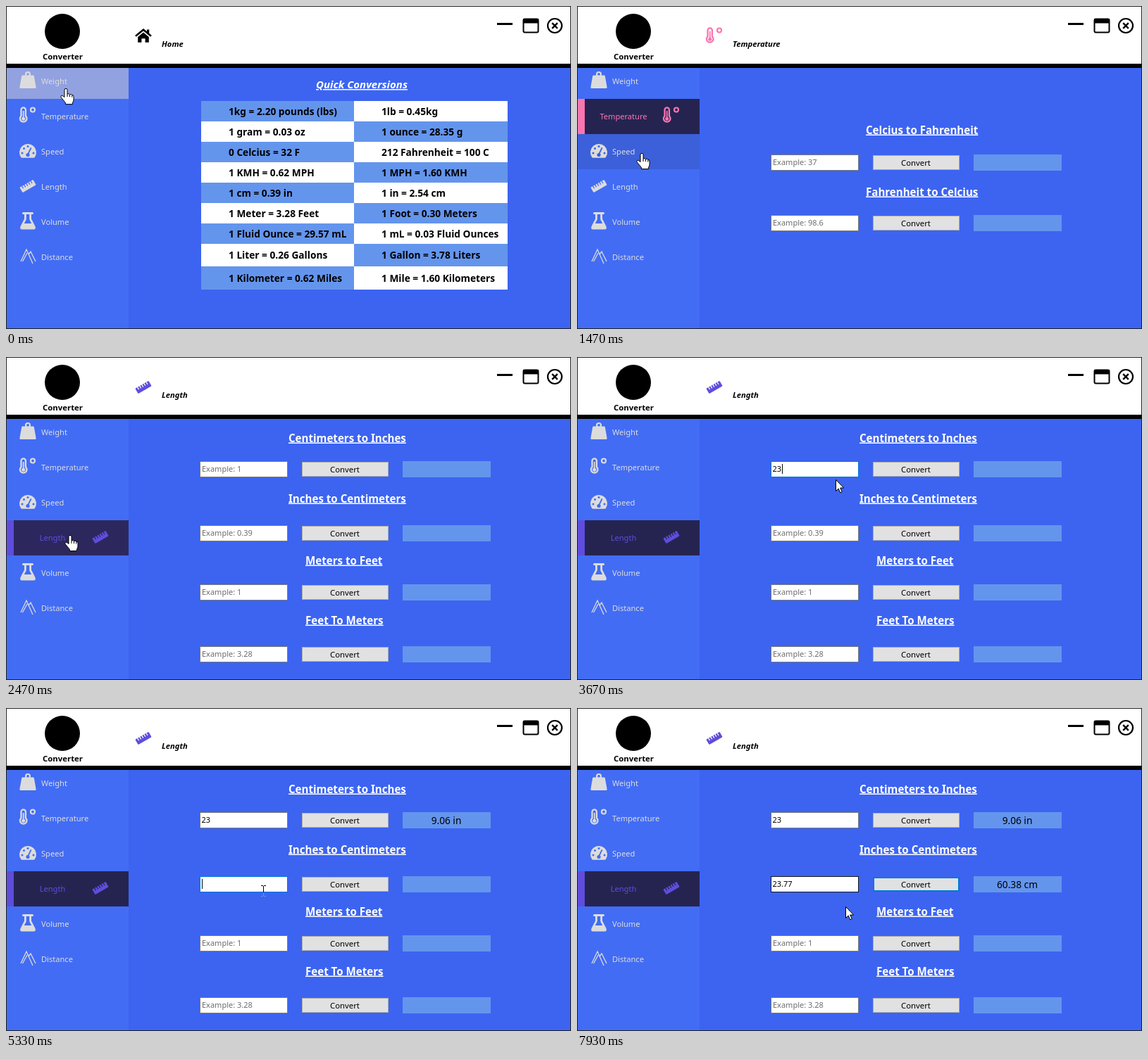
Animation of 802x459 px, one loop 8000 ms. Source, as an HTML page:

```html
<!DOCTYPE html>
<html lang="en">
<head>
<meta charset="utf-8">
<title>Converter</title>
<style>
html, body { margin: 0; width: 100%; height: 100%; overflow: hidden; background: #3c64f0 }
svg { display: block }
text { font-family: "Noto Sans", "Open Sans", sans-serif; font-size: 11px; white-space: pre }
.side { font-size: 11.1px }
.head { font-size: 11.2px; font-weight: 700; font-style: italic }
.title { font-size: 15.1px; font-weight: 700; text-decoration: underline; fill: #fff }
.cell { font-size: 13.7px; font-weight: 700 }
</style>
</head>
<body>
<svg id="stage" width="802" height="459" viewBox="0 0 802 459"></svg>
<script>
const LOOP = 8000, FPS = 15;
const BLUE = '#3c64f0', SIDE = '#426cf4', PALE = '#6495ed', FOCUS = '#0078d7';
const MENU = ['Weight', 'Temperature', 'Speed', 'Length', 'Volume', 'Distance'];
const TINT = ['#ac7ef1', '#f976b0', '#fd8a72', '#5f4ddd'];

const QUICK = [
  ['1kg = 2.20 pounds (lbs)', '1lb = 0.45kg'],
  ['1 gram = 0.03 oz', '1 ounce = 28.35 g'],
  ['0 Celcius = 32 F', '212 Fahrenheit = 100 C'],
  ['1 KMH = 0.62 MPH', '1 MPH = 1.60 KMH'],
  ['1 cm = 0.39 in', '1 in = 2.54 cm'],
  ['1 Meter = 3.28 Feet', '1 Foot = 0.30 Meters'],
  ['1 Fluid Ounce = 29.57 mL', '1 mL = 0.03 Fluid Ounces'],
  ['1 Liter = 0.26 Gallons', '1 Gallon = 3.78 Liters'],
  ['1 Kilometer = 0.62 Miles', '1 Mile = 1.60 Kilometers']
];

// title, title x, example
const FORMS = [
  [['Kilograms to Pounds', 401, '5.5'], ['Pounds to Kilograms', 401, '3.9'],
   ['Grams to Ounces', 415, '28'], ['Ounces to Grams', 415, '1']],
  [['Celcius to Fahrenheit', 410, '37'], ['Fahrenheit to Celcius', 410, '98.6']],
  [['KMH to MPH', 434, '1'], ['MPH to KMH', 434, '1']],
  [['Centimeters to Inches', 401, '1'], ['Inches to Centimeters', 401, '0.39'],
   ['Meters to Feet', 425, '1'], ['Feet To Meters', 425, '3.28']]
];
// title centre, input top
const ROWS4 = [[115, 148], [201, 239], [289, 323], [374, 411]];
const ROWS2 = [[176, 211], [264, 297]];

// pointer path: tick, x, y
const PATH = [
  [0, 85, 117], [5, 85, 117], [10, 97, 161], [19, 97, 161], [22, 92, 209], [28, 92, 209],
  [32, 91, 253], [39, 91, 253], [42, 125, 266], [45, 195, 248], [48, 300, 190], [51, 366, 157],
  [53, 366, 160], [55, 367, 174], [60, 410, 172], [65, 468, 160], [69, 468, 160], [73, 430, 195],
  [76, 380, 245], [78, 366, 257], [79, 366, 257], [80, 365, 260], [97, 365, 260], [98, 366, 257],
  [106, 366, 255], [109, 415, 247], [111, 470, 246], [114, 470, 246], [116, 425, 220],
  [117, 395, 245], [118, 385, 262], [119, 381, 282]
];

const rect = (x, y, w, h, fill, more = '') =>
  `<rect x="${x}" y="${y}" width="${w}" height="${h}" fill="${fill}" ${more}/>`;
const frame = (x, y, w, h, fill, line, t = 1) =>
  rect(x + t / 2, y + t / 2, w - t, h - t, fill, `stroke="${line}" stroke-width="${t}"`);
const text = (s, x, y, cls = '', more = '') => `<text x="${x}" y="${y}" class="${cls}" ${more}>${s}</text>`;
const path = (d, more = '') => `<path d="${d}" ${more}/>`;
const line = (d, w, col) => path(d, `fill="none" stroke="${col}" stroke-width="${w}"`);
const dot = (x, y, r, col) => `<circle cx="${x}" cy="${y}" r="${r}" fill="${col}"/>`;
const ring = (x, y, r, w, col) => `<circle cx="${x}" cy="${y}" r="${r}" fill="none" stroke="${col}" stroke-width="${w}"/>`;
const at = (x, y, body, more = '') => `<g transform="translate(${x} ${y})" ${more}>${body}</g>`;

const ICONS = {
  Home: c => line('M-11 .8L0-8.3 11 .8', 2.6, c) + rect(5, -8.5, 3.2, 6, c) +
    path('M-7.8 2L0-4.5 7.8 2V9.8H2.6V4.2H-2.6V9.8H-7.8Z'),
  Weight: c => ring(0, -8, 3, 2.2, c) +
    path('M-7.5-6.5h15q1 0 1.3 1L11.6 10.3q.4 1.7-1.2 1.7H-10.4q-1.6 0-1.2-1.7L-8.8-5.5q.3-1 1.3-1Z'),
  Temperature: c => line('M-9.5-7.5a3.2 3.2 0 0 1 6.4 0v8.8a4.8 4.8 0 1 1-6.4 0Z', 2.3, c) +
    dot(-6.3, 5.2, 2.5, c) + line('M-6.3-6V5', 1.8, c) + ring(7, -7.5, 3, 2.2, c),
  Speed: (c, bg) => path('M-9.8 10A12 12 0 1 1 9.8 10Q9.3 10.7 8.4 10.7H-8.4Q-9.3 10.7-9.8 10Z') +
    [[-8, 4], [-5.5, -2.5], [0, -5.5], [8, 4]].map(p => dot(...p, 1.5, bg)).join('') +
    line('M0 6L4.6-3.6', 1.8, bg) + dot(0, 6.5, 2.6, bg),
  Length: (c, bg) => `<g transform="translate(0 1) rotate(-30)">` + rect(-11, -4.2, 22, 8.4, c, 'rx="1"') +
    line('M-7.2-4.5V-.5M-3.6-4.5V-.5M0-4.5V-.5M3.6-4.5V-.5M7.2-4.5V-.5', 1.3, bg) + '</g>',
  Volume: () => path('M-6.5-12h13a1 1 0 0 1 0 3H5v6.5L10.4 8q1.6 4.5-2.3 4.5H-8.1Q-12 12.5-10.4 8L-5-2.5V-9h-1.5a1 1 0 0 1 0-3Z' +
    'M-2.2-9H2.2V-1.8L5.2 4H-5.2L-2.2-1.8Z', 'fill-rule="evenodd"'),
  Distance: c => line('M-10 8L-2-9 7 11M-7.5 8L-1-4M1-2L4-6 11 8', 1.3, c)
};
const icon = (name, x, y, col, bg) => at(x, y, ICONS[name](col, bg), `fill="${col}"`);

function pointer(n) {
  let i = 0;
  while (i < PATH.length - 2 && PATH[i + 1][0] <= n) i++;
  const [t0, x0, y0] = PATH[i], [t1, x1, y1] = PATH[i + 1];
  const k = Math.min(1, (n - t0) / (t1 - t0));
  return [x0 + (x1 - x0) * k, y0 + (y1 - y0) * k].map(Math.round);
}

function header(page) {
  const name = page < 0 ? 'Home' : MENU[page];
  return rect(0, 0, 802, 82, '#fff') + dot(80, 36, 25, '#000') +
    text('Converter', 80.5, 76, '', 'text-anchor="middle" style="font-size:11.4px;font-weight:700"') +
    icon(name, 195, 42, page < 0 ? '#000' : TINT[page], '#fff') + text(name, 221, 58, 'head') +
    line('M697 25.5H719', 3, '#000') +
    rect(734.5, 18.5, 21, 19, '#fff', 'rx="2" stroke="#000" stroke-width="2"') + rect(734, 18, 22, 6.5, '#000') +
    ring(779, 28, 10, 2.2, '#000') + line('M775.2 24.2l7.6 7.6m0-7.6l-7.6 7.6', 2.4, '#000');
}

function sidebar(page, n, x, y) {
  const over = x < 174 ? Math.floor((y - 82) / 50) : -1;
  const pressed = n < 2 || [13, 25, 36].includes(n);
  let out = rect(0, 82, 174, 377, SIDE);
  MENU.forEach((name, i) => {
    const top = 82 + 50 * i, on = i === page, hot = i === over;
    const bg = on ? (hot ? '#2c285e' : '#252451') : !hot ? SIDE : pressed ? '#92a1e0' : '#3c60d9';
    const col = on ? TINT[i] : '#dcdcdc';
    out += rect(0, top, 174, 50, bg) + icon(name, on ? 134 : 31, top + 23, col, bg) +
      text(name, on ? 66 : 50, top + 29, 'side', `fill="${col}"` + (on ? ' text-anchor="middle"' : ''));
  });
  out += rect(0, 82, 802, 6, '#000');
  if (page >= 0) out += rect(1, 82 + 50 * page, 10, 50, TINT[page]);
  return out;
}

function quickTable() {
  let out = text('Quick Conversions', 440, 117, 'title', 'style="font-style:italic;font-size:15px"');
  const tops = [135, 164, 193, 222, 251, 280, 309, 338, 370, 403];
  QUICK.forEach((row, r) => row.forEach((s, c) => {
    const y = tops[r], h = tops[r + 1] - y;
    out += rect(c ? 494 : 277, y, c ? 218 : 217, h, (r + c) % 2 ? '#fff' : PALE) +
      text(s, c ? 533 : 316, y + h / 2 + 5.3, 'cell');
  }));
  return out;
}

// Contents and focus of the two fields used on the Length page
function fieldState(i, n, x, y) {
  const s = {};
  const overButton = x >= 420 && x < 543 && y >= ROWS4[i][1] && y < ROWS4[i][1] + 23;
  if (i === 0) {
    if (n >= 51) s.value = n < 53 ? '' : n < 54 ? '2' : '23';
    s.focus = n >= 51 && n < 66;
    s.button = n >= 66 && n < 78;
    s.down = n === 66 || n === 67;
    if (n >= 68) s.result = '9.06 in';
  } else {
    if (n >= 78) s.value = '23.77'.slice(0, n < 83 ? 0 : n < 85 ? 1 : n < 94 ? 2 : n < 102 ? 3 : n < 104 ? 4 : 5);
    s.focus = n >= 78 && n < 112;
    s.button = n >= 112;
    s.down = n === 112 || n === 113;
    s.hot = n >= 117;
    if (n >= 114) s.result = '60.38 cm';
  }
  s.caret = s.focus && n !== 93;
  s.over = overButton;
  return s;
}

function form(page, n, x, y) {
  const rows = FORMS[page], places = rows.length > 2 ? ROWS4 : ROWS2;
  return rows.map(([title, left, example], i) => {
    const [mid, top] = places[i];
    const s = page === 3 && i < 2 ? fieldState(i, n, x, y) : {};
    let out = text(title, left, mid + 5.5, 'title') +
      frame(275, top, 125, 23, '#fff', s.focus ? FOCUS : s.hot ? '#171717' : '#7a7a7a') +
      (s.value === undefined
        ? text('Example: ' + example, 278, top + 15, '', 'fill="#6d6d6d"')
        : text(s.value, 277.5, top + 15));
    if (s.caret) {
      const w = [...s.value].reduce((sum, c) => sum + (c === '.' ? 3 : 6.3), 0);
      out += rect(278 + Math.round(w), top + 4, 1, 14, '#000');
    }
    out += frame(420, top + 1, 123, 21, s.down ? '#cce4f7' : s.over ? '#e5f1fb' : '#e1e1e1',
        s.over || s.button ? FOCUS : '#adadad', s.button && !s.over ? 2 : 1) +
      text('Convert', 481, top + 16, '', 'text-anchor="middle" style="font-size:11.3px"') +
      rect(563, top, 125, 23, PALE);
    if (s.result) out += text(s.result, 625, top + 17, '', 'text-anchor="middle" style="font-size:13.7px"');
    return out;
  }).join('');
}

function cursor(n, x, y) {
  if (n === 53 || n === 54 || (n >= 83 && n < 98) || (n >= 102 && n < 106)) return '';
  const skin = 'fill="#fff" stroke="#000" stroke-linejoin="round"';
  if (x < 174) return at(x, y, path('M-2 2.2Q-2 .4 0 .4T2 2.2V8q2.5-1 3.5.6 2.5-.6 3.2.8 2.3-.2 2.3 2.2v4.6q0 2-1.6 4.2v2.2H-.6V20.4L-6.4 13.4q-1.5-2 0-3 1.6-.8 4.4 2.2Z', skin) +
    line('M2 8v4M5.5 8.8v3.4M8.7 9.6v3', 1, '#000'));
  const box = ROWS4.slice(0, 2).find(([, top]) => x >= 275 && x < 400 && y >= top && y < top + 23);
  if (!box) return at(x, y, path('M.5.5V16.5L4.2 13 6.7 18.8 9.2 17.7 6.7 12H11.6Z', skin));
  const beam = col => line(`M${x - 3} ${y - 7.5}h3m1 0h3m-7 15h3m1 0h3M${x + .5} ${y - 7}v14`, 1, col);
  // Dark only where it lies over the white field
  return beam('#6a92f0') +
    `<svg x="275" y="${box[1]}" width="125" height="23" viewBox="275 ${box[1]} 125 23">${beam('#000')}</svg>`;
}

function scene(n) {
  const [x, y] = pointer(n);
  const page = n < 2 ? -1 : n < 14 ? 0 : n < 26 ? 1 : n < 37 ? 2 : 3;
  return rect(0, 0, 802, 459, BLUE) + header(page) + sidebar(page, n, x, y) +
    (page < 0 ? quickTable() : form(page, n, x, y)) +
    frame(0, 0, 802, 459, 'none', '#222') + cursor(n, x, y);
}

const stage = document.getElementById('stage');
let shown = -1;
function tick() {
  const n = Math.floor((performance.now() % LOOP + 4) * FPS / 1000) % (LOOP * FPS / 1000);
  if (n !== shown) stage.innerHTML = scene(shown = n);
  requestAnimationFrame(tick);
}
tick();
</script>
</body>
</html>
```
